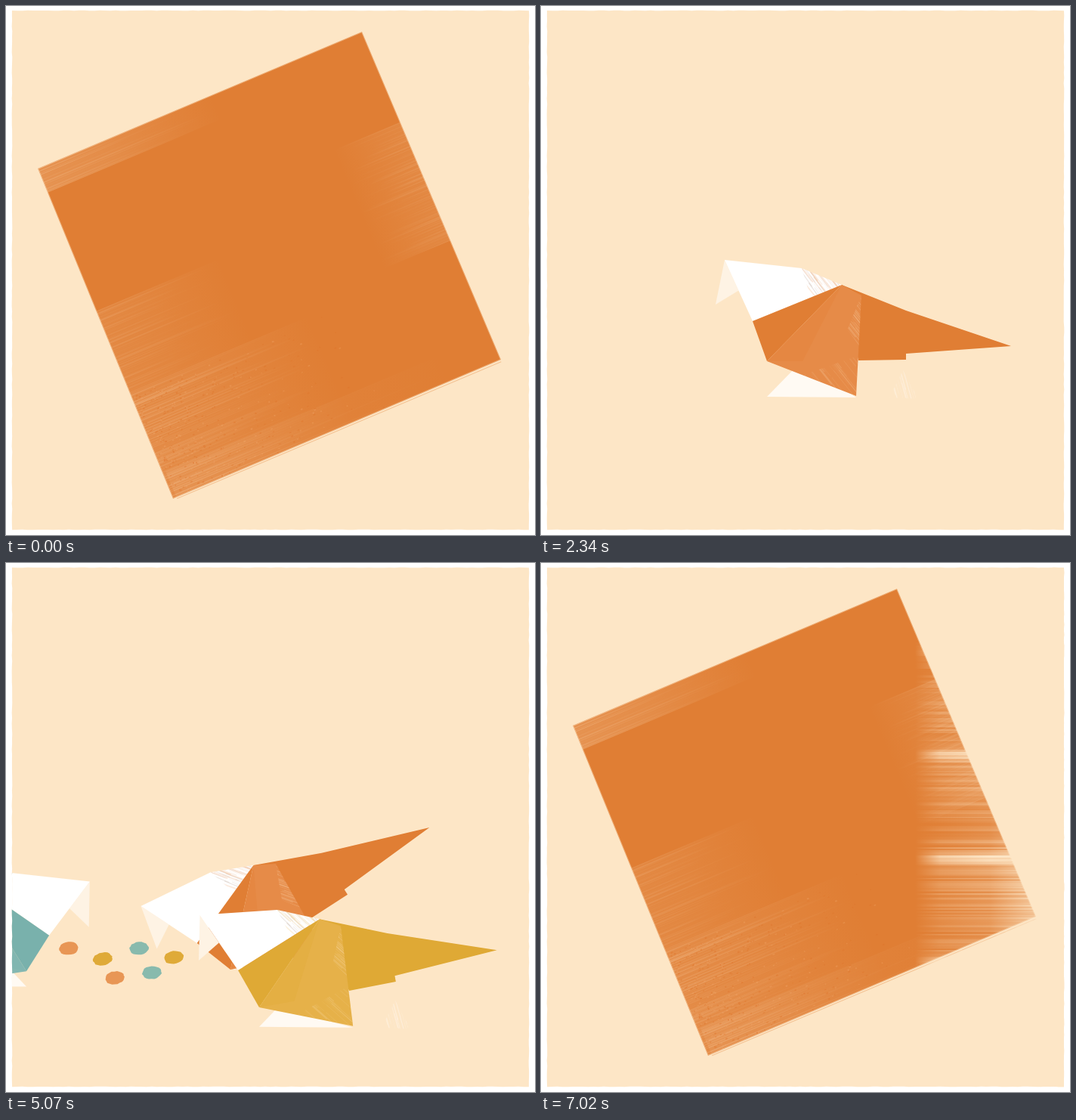
An HTML page with a canvas for the animation above (7150 ms loop, 700x700 px).

```html
<!DOCTYPE html>
<html lang="en">
<head>
<meta charset="utf-8">
<title>Paper birds</title>
<style>
  html, body { margin: 0; width: 100%; height: 100%; overflow: hidden; background: #fff; }
  canvas { display: block; width: 100vw; height: 100vh; }
</style>
</head>
<body>
<canvas id="stage" width="700" height="700"></canvas>
<script>
const ctx = document.getElementById('stage').getContext('2d');
const STEP = 130, STEPS = 55;
const CREAM = '#fde6c6', WHITE = '#fff', PALE = '#fef5ea';
const ORANGE = { dark: '#e07e34', mid: '#e68b48', seed: '#e89655' };
const YELLOW = { dark: '#dfa935', mid: '#e6b149', seed: '#dfaa38' };
const TEAL = { dark: '#79b1ac', mid: '#84b8b2', seed: '#88baad' };

// ---- maths
function rng(seed) {
  let s = seed * 7919 + 17;
  return () => {
    s = (s * 1664525 + 1013904223) % 4294967296;
    return s / 4294967296;
  };
}
const lerp = (a, b, k) => a + (b - a) * k;
const between = (p, q, k) => [lerp(p[0], q[0], k), lerp(p[1], q[1], k)];
const clamp = v => Math.max(0, Math.min(1, v));
const ramp = (n, from, to) => {
  const k = clamp((n - from) / (to - from));
  return k * k * (3 - 2 * k);
};
// Cosine of a sheet turned over between two steps: 1 to -1
const turning = (n, from, to) => Math.cos(Math.PI * clamp((n - from) / (to - from)));

// Turn point p about the crease ab; c is the cosine of the fold angle
function fold([x, y], [ax, ay], [bx, by], c) {
  const dx = bx - ax, dy = by - ay;
  const t = ((x - ax) * dx + (y - ay) * dy) / (dx * dx + dy * dy);
  const fx = ax + t * dx, fy = ay + t * dy;
  return [fx + c * (x - fx), fy + c * (y - fy)];
}

// ---- drawing
function trace(pts) {
  ctx.beginPath();
  pts.forEach(p => ctx.lineTo(p[0], p[1]));
  ctx.closePath();
}
function poly(pts, color, alpha = 1) {
  ctx.save();
  ctx.globalAlpha *= alpha;
  ctx.fillStyle = color;
  trace(pts);
  ctx.fill();
  ctx.restore();
}
function within(pts, paint) {
  ctx.save();
  trace(pts);
  ctx.clip();
  paint();
  ctx.restore();
}

// Dry brush lines inside a polygon
function hatch(pts, color, angle, count, alpha) {
  const r = rng(count), xs = pts.map(p => p[0]), ys = pts.map(p => p[1]);
  const range = v => lerp(Math.min(...v), Math.max(...v), r());
  within(pts, () => {
    const base = ctx.globalAlpha;
    ctx.strokeStyle = color;
    for (let i = 0; i < count; i++) {
      const x = range(xs), y = range(ys), h = 8 + 22 * r();
      ctx.globalAlpha = base * alpha * r();
      ctx.lineWidth = 0.5 + 1.2 * r();
      ctx.beginPath();
      ctx.moveTo(x - h * Math.cos(angle), y - h * Math.sin(angle));
      ctx.lineTo(x + h * Math.cos(angle), y + h * Math.sin(angle));
      ctx.stroke();
    }
  });
}

// ---- page with slightly rough edges
const PAGE = [];
{
  const r = rng(3), corners = [[8, 6], [692, 6], [692, 693], [8, 693]];
  corners.forEach((p, i) => {
    for (let k = 0; k < 1; k += 0.01) {
      PAGE.push(between(p, corners[(i + 1) % 4], k).map(v => v + 0.7 * (r() - 0.5)));
    }
  });
}

// ---- square sheet
const A = [42, 215], B = [471, 34], T = [655, 468], D = [221, 652];
const SQUARE = [A, B, T, D];
const TILT = Math.atan2(B[1] - A[1], B[0] - A[0]);
const SIDE = Math.hypot(B[0] - A[0], B[1] - A[1]);
const tint = a => `rgba(253,226,192,${a})`;

function fadeRect(x, y, w, h, alpha) {
  const g = ctx.createLinearGradient(x, 0, x + w, 0);
  g.addColorStop(0, tint(alpha));
  g.addColorStop(0.4, tint(alpha * 0.7));
  g.addColorStop(1, tint(0));
  ctx.fillStyle = g;
  ctx.fillRect(Math.min(x, x + w), y, Math.abs(w), h);
}
// A soft lighter band with thin streaks, fading along the stroke
function band(v0, v1, u, reach, alpha) {
  const r = rng(v0 + v1);
  fadeRect(u, v0, reach, v1 - v0, alpha);
  for (let v = v0; v < v1; v += 1 + 3 * r()) {
    fadeRect(u, v, reach * (0.4 + 0.6 * r()), 0.6 + 1.6 * r(), alpha * 1.5 * r());
  }
}
function sheet() {
  poly(SQUARE, ORANGE.dark);
  ctx.save();
  ctx.translate(A[0], A[1]);
  ctx.rotate(TILT);
  ctx.fillStyle = 'rgba(224,126,52,.35)';
  ctx.fillRect(0, 473.5, SIDE, 1);
  ctx.restore();
  within(SQUARE, () => {
    ctx.translate(A[0], A[1]);
    ctx.rotate(TILT);
    band(0, 34, 0, 250, 0.2);
    band(204, 320, -4, 180, 0.1);
    band(320, 472, -4, 260, 0.13);
    band(435, 472, 0, 400, 0.08);
    band(130, 300, SIDE + 4, -100, 0.1);
    const r = rng(11);
    for (let i = 0; i < 420; i++) {
      ctx.fillStyle = r() < 0.6 ? 'rgba(222,116,42,.45)' : 'rgba(245,180,125,.25)';
      ctx.fillRect(320 * r() * r(), 325 + 145 * r(), 1 + 2 * r(), 1 + r());
    }
  });
  ctx.save();
  ctx.globalAlpha = 0.4;
  ctx.strokeStyle = CREAM;
  ctx.lineWidth = 2;
  trace(SQUARE);
  ctx.stroke();
  ctx.restore();
}

// Horizontal brush laying the sheet down from the left
function paintIn(n) {
  const edge = 60 + 88 * (n - 49), reach = 160, r = rng(21);
  sheet();
  ctx.fillStyle = CREAM;
  ctx.fillRect(edge + reach, 0, 700, 700);
  for (let y = 16; y < 665;) {
    const h = 0.8 + 2.4 * r();
    const gap = Math.max(0, Math.cos((y - 253) / 137 * 2 * Math.PI)) ** 16;
    const a = clamp(0.38 * r() + 0.75 * gap);
    const g = ctx.createLinearGradient(edge - 5, 0, edge + reach, 0);
    const stop = (k, alpha) => g.addColorStop(k, `rgba(253,230,198,${clamp(alpha)})`);
    stop(0, 0);
    stop(0.2, a * 0.8);
    stop(0.6, a + 0.1);
    stop(1, a + 0.25 + y / 1200);
    ctx.fillStyle = g;
    ctx.fillRect(edge - 5, y, reach + 6, h);
    y += h;
  }
}

// ---- folding: key points above the centre line, mirrored below it
const KITE = Math.tan(Math.PI / 8);
const K1 = between(B, A, KITE), K2 = between(D, A, KITE);
const E = [228, 291], M = [408, 363], TIP = [653, 468];
const P = [355, 240], G = [409, 216];                  // edge of the head, shoulder
const F = [437, 176], N = [441, 350], Q = [518, 264];  // loose flap
const W = [583, 278], R = [505, 318], S = [439, 226];  // wing
const across = c => p => fold(p, E, T, c);
const below = across(-1);

const foldedSheet = pts => within(pts, sheet);

function foldSheet(n) {
  if (n === 0) return sheet();
  const side = Math.max(0, turning(n, 0, 6));
  const nose = turning(n, 6, 9);
  const cheek = Math.max(0, turning(n, 9, 12));
  const tip = fold(A, K1, K2, nose);
  if (nose > 0) {
    return foldedSheet([tip, K1, fold(B, K1, T, side), T, fold(D, K2, T, side), K2]);
  }
  const k1 = fold(K1, E, G, cheek), k2 = fold(K2, E, below(G), cheek);
  foldedSheet([E, k1, G, TIP, below(G), k2]);
  poly(n < 9 ? [K1, tip, K2] : [E, k1, P, M, below(P), k2], WHITE);
}

// One half of the folded kite; c squeezes it onto or across the centre line
function half(c, loose) {
  const at = across(c), [p, g, f, nn, q, w, r, s] = [P, G, F, N, Q, W, R, S].map(at);
  const angle = Math.atan2(w[1] - g[1], w[0] - g[0]);
  const body = [p, g, s, nn, M], flap = [s, nn, q];
  const fade = ctx.createLinearGradient(g[0], g[1], w[0], w[1]);
  fade.addColorStop(0, 'rgba(226,132,60,.95)');
  fade.addColorStop(0.5, 'rgba(235,160,95,.8)');
  fade.addColorStop(1, 'rgba(248,208,160,.15)');
  ctx.save();
  ctx.globalAlpha *= loose;
  poly([f, nn, q], PALE, 0.8);
  poly([g, w, r], fade);
  hatch([g, w, r], CREAM, angle, 110, 0.6);
  ctx.restore();
  poly([M, g, TIP], ORANGE.dark);
  poly(flap, ORANGE.mid, 0.6 * loose);
  hatch(flap, CREAM, angle, 70, 0.6 * loose);
  poly(body, ORANGE.mid);
  hatch(body, ORANGE.dark, 1.1, 40, 0.5);
  poly([E, p, M], WHITE);
}

function kite(c) {
  poly([M, across(0.05)(G), TIP, across(-0.05)(G)], ORANGE.dark);
  if (c > 0.02) half(c, c);
  half(-1, 1);
  poly([E, across(0.04)(P), M, across(-0.04)(P)], WHITE);
  hatch([between(P, M, 0.5), M, between(below(P), M, 0.4)], '#e9b79c', 1.15, 45, 0.45);
}

// ---- bird: flat points move to finished points
const FLAT = {
  beak: E, crown: between(E, M, 0.5), top: M, neck: below(P), chin: below(P),
  foot: below(G), hand: below(Q), pit: below(N),
  back: between(M, TIP, 0.33), tip: TIP, notch: [483, 470], under: [420, 471]
};
const BIRD = {
  beak: [243, 336], crown: [345, 347], top: [398, 369], neck: [280, 417], chin: [231, 395],
  foot: [299, 470], hand: [417, 516], pit: [424, 383],
  back: [483, 403], tip: [622, 450], notch: [483, 460], under: [420, 469]
};
const FOOT = BIRD.foot;

function bird(pal, { x, y, turn }, k = 1, flip = 1) {
  const b = {};
  for (const key in BIRD) b[key] = between(FLAT[key], BIRD[key], k);
  const a = turn * Math.PI / 180, dx = BIRD.hand[0] - FOOT[0], dy = BIRD.hand[1] - FOOT[1];
  const tx = dx * Math.cos(a) - dy * Math.sin(a), ty = dx * Math.sin(a) + dy * Math.cos(a);
  ctx.save();
  ctx.translate(x, y);
  ctx.scale(flip, 1);
  // far foot and a faint haze stay level with the ground
  poly([[0, ty + 1], [Math.max(ty, 4), 0], [tx, ty + 2]], '#fffaf3');
  hatch([[162, ty + 2], [180, ty - 34], [200, ty + 4]], PALE, 1.3, 20, 0.5);

  ctx.rotate(a);
  ctx.translate(-FOOT[0], -FOOT[1]);
  const mid = between(b.foot, b.hand, 0.4);
  poly([b.top, b.back, b.tip, b.notch, [b.notch[0], b.under[1] - 1], b.under], pal.dark);
  poly([b.beak, b.chin, between(b.beak, b.neck, 0.5)], '#fef3e4');
  poly([b.beak, b.crown, b.top, b.neck], WHITE);
  const nape = [b.crown, b.top, between(b.top, b.neck, 0.35)];
  hatch(nape, '#b59a8c', 0.95, 30, 0.28);
  hatch(nape, pal.mid, 0.9, 24, 0.35);
  poly([b.neck, b.top, b.foot], pal.dark);
  poly([b.foot, b.top, b.pit, b.hand], pal.mid);
  poly([b.foot, b.top, [mid[0], b.foot[1]]], pal.dark, 0.28);
  hatch([between(b.top, b.hand, 0.4), b.pit, between(b.pit, b.hand, 0.5)], CREAM, 0.9, 38, 0.25);
  hatch([mid, between(b.pit, b.hand, 0.6), b.hand], CREAM, 0.9, 36, 0.22);
  hatch([b.neck, b.top, between(b.top, b.foot, 0.06), between(b.neck, b.foot, 0.1)], CREAM, -0.39, 16, 0.4);
  ctx.restore();
}

// ---- paths of the three birds
function orangePose(n) {
  const drop = ramp(n, 27, 32);
  const lift = n < 39 ? 0 : Math.sin((n - 39) * 1.5 * Math.PI / 7) ** 2;
  return { x: 299 - 2 * drop - 4 * lift, y: 470 + 68 * drop - 35 * lift, turn: -32 * drop + 16.4 * lift };
}
function yellowPose(n) {
  return {
    x: Math.max(230, 541 - 51.5 * (n - 35)),
    y: 576 + 3 * Math.min(n - 35, 8.4),
    turn: -10 - 11 * ramp(n, 39, 45)
  };
}
function tealPose(n) {
  const dip = 1 - Math.exp(-Math.max(0, n - 35) / 6);
  return { x: 27 - 108 * (1 - ramp(n, 31, 35)), y: 512 + 58 * dip, turn: 3 - 32 * dip };
}

// ---- seeds: a point in the air at step 27 and a resting point, two of each colour
const AIR = [[91, 239], [199, 327], [78, 319], [180, 391], [176, 342], [198, 353]];
const REST = [[176, 510], [193, 542], [83, 510], [144, 549], [222, 522], [128, 524]];
const FALL = 65;

function seeds(n) {
  AIR.forEach((air, i) => {
    const rest = REST[i], steps = n - 27, r = rng(60 + i), tilt = -0.25 * r(), pts = [];
    const [x, y] = steps < 0
      ? [air[0] - 3 * steps, air[1] + FALL * steps]
      : between(air, rest, clamp(steps * FALL / (rest[1] - air[1])));
    for (let t = 0; t < 2 * Math.PI; t += 0.28) {
      const w = 0.95 + 0.1 * r(), u = 12.8 * w * Math.cos(t), v = 8.6 * w * Math.sin(t);
      pts.push([x + u * Math.cos(tilt) - v * Math.sin(tilt), y + u * Math.sin(tilt) + v * Math.cos(tilt)]);
    }
    poly(pts, [TEAL, ORANGE, YELLOW][i >> 1].seed);
  });
}

// ---- one picture
function scene(n) {
  if (n < 12) return foldSheet(n);
  if (n < 14) return kite(Math.cos(Math.PI / 2 * (n - 12) / 4));
  if (n < 48) {
    ctx.globalAlpha = n < 47 ? 1 : 0.45;
    seeds(n);
    bird(ORANGE, orangePose(n), ramp(n, 13, 18));
    if (n > 30) {
      bird(YELLOW, yellowPose(n));
      bird(TEAL, tealPose(n), 1, -1);
    }
  }
  if (n > 48) paintIn(n);
}
function draw(n) {
  ctx.fillStyle = WHITE;
  ctx.fillRect(0, 0, 700, 700);
  poly(PAGE, CREAM);
  within(PAGE, () => scene(n));
}

let shown = -1;
const start = performance.now();
function tick() {
  const n = Math.floor(Math.max(0, performance.now() - start) / STEP) % STEPS;
  if (n !== shown) draw(shown = n);
  requestAnimationFrame(tick);
}
tick();
</script>
</body>
</html>
```
